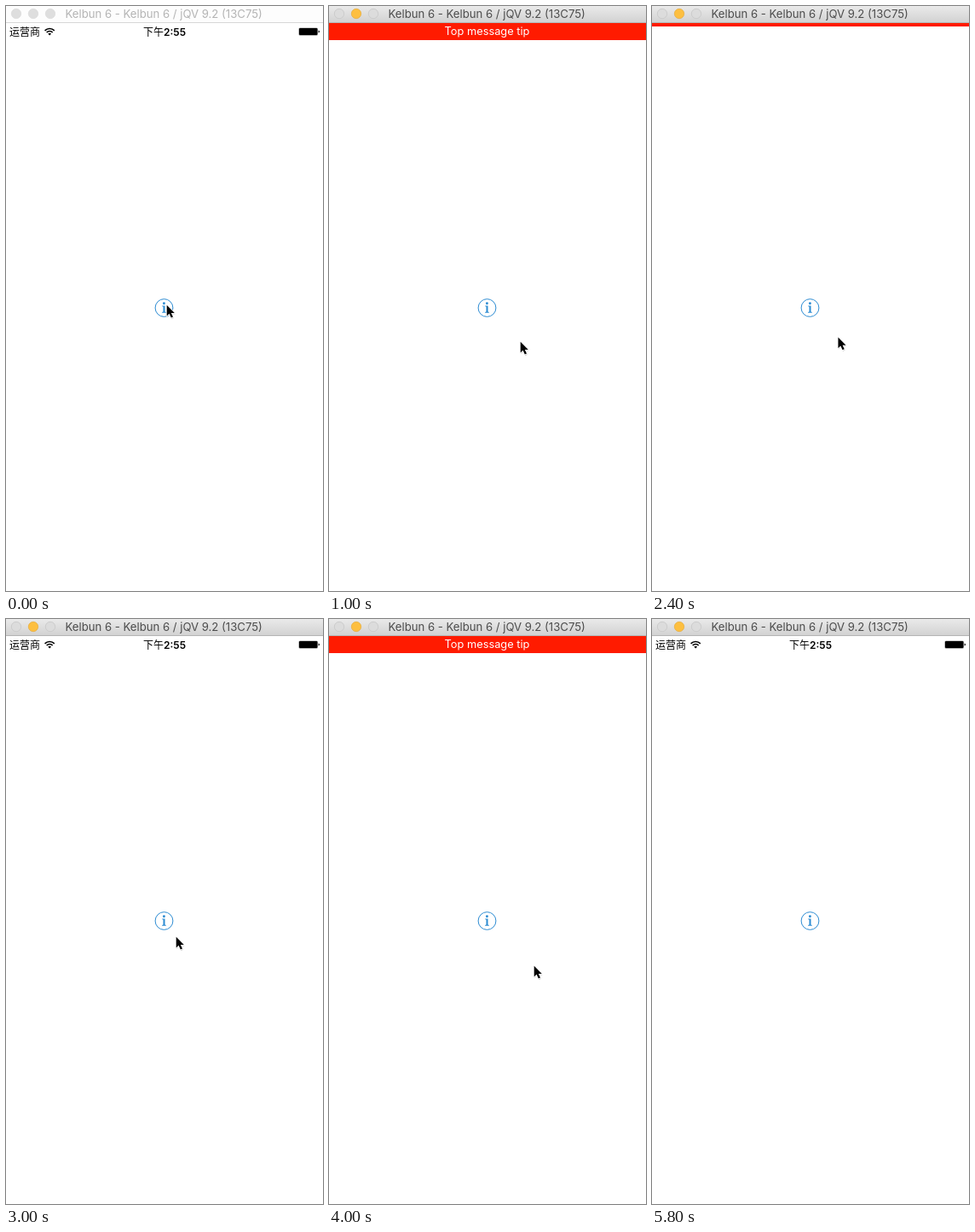
An HTML page that plays this animation: 372x686 px, repeating every 6.4 s.

```html
<!DOCTYPE html>
<html lang="zh">
<head>
<meta charset="utf-8">
<title>Top message tip</title>
<style>
  html, body { margin: 0; width: 100%; height: 100%; overflow: hidden; background: #fff; }
  svg { display: block; width: 372px; height: 686px; }
  text { font-family: Inter, "Noto Sans CJK SC", "Noto Sans CJK", sans-serif; }
  #title { font-size: 13.15px; fill: #4c4c4c; }
  .light { fill: #dcdcdc; stroke: #c4c4c4; stroke-width: .7; }
  .light.minimize { fill: #fdbf40; stroke: #e6ab3a; }
  #edge { fill: #b5b5b5; }
  .inactive #chrome { fill: #fdfdfd; }
  .inactive #edge { fill: #d6d6d6; }
  .inactive #title { fill: #b4b4b4; }
  .inactive .light { fill: #dedede; stroke: #dadada; }
  #status text { font-size: 12px; }
  #status .clock { font-weight: 500; }
  #status tspan { font-weight: 600; }
  #tip text { font-size: 12.8px; fill: #fff; }
</style>
</head>
<body>
<svg id="stage" viewBox="0 0 372 686">
  <defs>
    <linearGradient id="metal" x2="0" y2="1">
      <stop stop-color="#eaeaea"/><stop offset="1" stop-color="#d2d2d2"/>
    </linearGradient>
    <clipPath id="reveal"><rect id="mask" y="20" width="372" height="0"/></clipPath>
  </defs>

  <rect id="chrome" width="372" height="19" fill="url(#metal)"/>
  <rect id="edge" y="19" width="372" height="1"/>
  <circle class="light" cx="12" cy="9" r="5.7"/>
  <circle class="light minimize" cx="32" cy="9" r="5.7"/>
  <circle class="light" cx="52" cy="9" r="5.7"/>
  <text id="title" x="69.5" y="14">Kelbun 6 - Kelbun 6 / jQV 9.2 (13C75)</text>

  <g id="status">
    <text x="4" y="34.5">运营商</text>
    <g fill="none" stroke="#000" stroke-width="1.7">
      <path d="M45.6 28.8a8 8 0 0 1 11.2 0M47.7 31a5 5 0 0 1 7 0"/>
      <path d="M51.2 34.6l-1.9-2a2.8 2.8 0 0 1 3.8 0z" fill="#000" stroke="none"/>
    </g>
    <text class="clock" x="161" y="34.5">下午<tspan>2:55</tspan></text>
    <rect x="343.4" y="25.5" width="22.6" height="9.2" rx="1.6" opacity=".4"/>
    <rect x="344" y="26.1" width="21.4" height="8" rx="1"/>
    <path d="M366.6 28.4q1.4.4 1.4 1.6t-1.4 1.6z"/>
  </g>

  <g id="tip" clip-path="url(#reveal)">
    <rect y="20" width="372" height="20" fill="#ff1b00"/>
    <text x="185.5" y="34" text-anchor="middle">Top message tip</text>
  </g>

  <g id="info" fill="#2b8bd2">
    <circle cx="185.5" cy="354" r="10.4" fill="none" stroke="#2b8bd2"/>
    <circle cx="185.4" cy="348.7" r="1.45"/>
    <path d="M183.2 351.4h3.3v7.2l1.3.3v.8h-4.7v-.8l1.4-.3v-6.1l-1.3-.3z"/>
  </g>

  <g id="cursor" stroke-linejoin="round">
    <path d="M1 2v13l3-2.6 2.3 4.8 2.6-1.1-2.2-4.6h4z" opacity=".18"/>
    <path d="M.7.7v12.8l2.9-2.7 2.2 4.8 2.2-1-2.2-4.7h4z" stroke="#fff" stroke-width="1.6" paint-order="stroke"/>
  </g>
</svg>
<script>
  const LOOP = 6400, STEP = 100, BAR_HEIGHT = 20;
  const CLICKS = [106, 3410];               // each click shows the tip once
  const SLIDE = 300, HIDE_AFTER = 2080;     // ms, counted from the click
  const HELD = 200, RELEASED = 590, DIMMED = .55;
  const CURSOR_GONE = 5800;

  // Key points of the pointer's path, straight moves between them
  const path = [
    { at: 300, x: 188, y: 350 }, { at: 700, x: 224, y: 393 },
    { at: 2200, x: 224, y: 393 }, { at: 3000, x: 199, y: 372 },
    { at: 3300, x: 167, y: 336 }, { at: 3500, x: 188, y: 355 },
    { at: 3650, x: 188, y: 355 }, { at: 4000, x: 240, y: 406 }
  ];

  const $ = id => document.getElementById(id);
  const progress = (t, from, to) => Math.min(1, Math.max(0, (t - from) / (to - from)));
  const ease = p => p * p * (3 - 2 * p);

  function pointerAt(t) {
    let { x, y } = path[0];
    for (let i = 1; i < path.length; i++) {
      const p = progress(t, path[i - 1].at, path[i].at);
      x += (path[i].x - path[i - 1].x) * p;
      y += (path[i].y - path[i - 1].y) * p;
    }
    return `${x} ${y}`;
  }

  function draw(t) {
    const age = t - (CLICKS.findLast(click => click <= t) ?? Infinity);
    const shown = ease(progress(age, 0, SLIDE)) - ease(progress(age, HIDE_AFTER, HIDE_AFTER + SLIDE));
    const dim = age < 0 ? 0 : 1 - progress(age, HELD, RELEASED);

    $('stage').classList.toggle('inactive', t < STEP);
    $('mask').setAttribute('height', BAR_HEIGHT * shown);
    $('status').style.display = shown > 0 ? 'none' : '';
    $('info').setAttribute('opacity', 1 - (1 - DIMMED) * dim);
    $('cursor').style.display = t < CURSOR_GONE ? '' : 'none';
    $('cursor').setAttribute('transform', `translate(${pointerAt(t)})`);
  }

  const start = performance.now();
  function tick() {
    const t = (performance.now() - start) % LOOP;
    draw(Math.floor(t / STEP) * STEP);
    requestAnimationFrame(tick);
  }
  tick();
</script>
</body>
</html>
```
